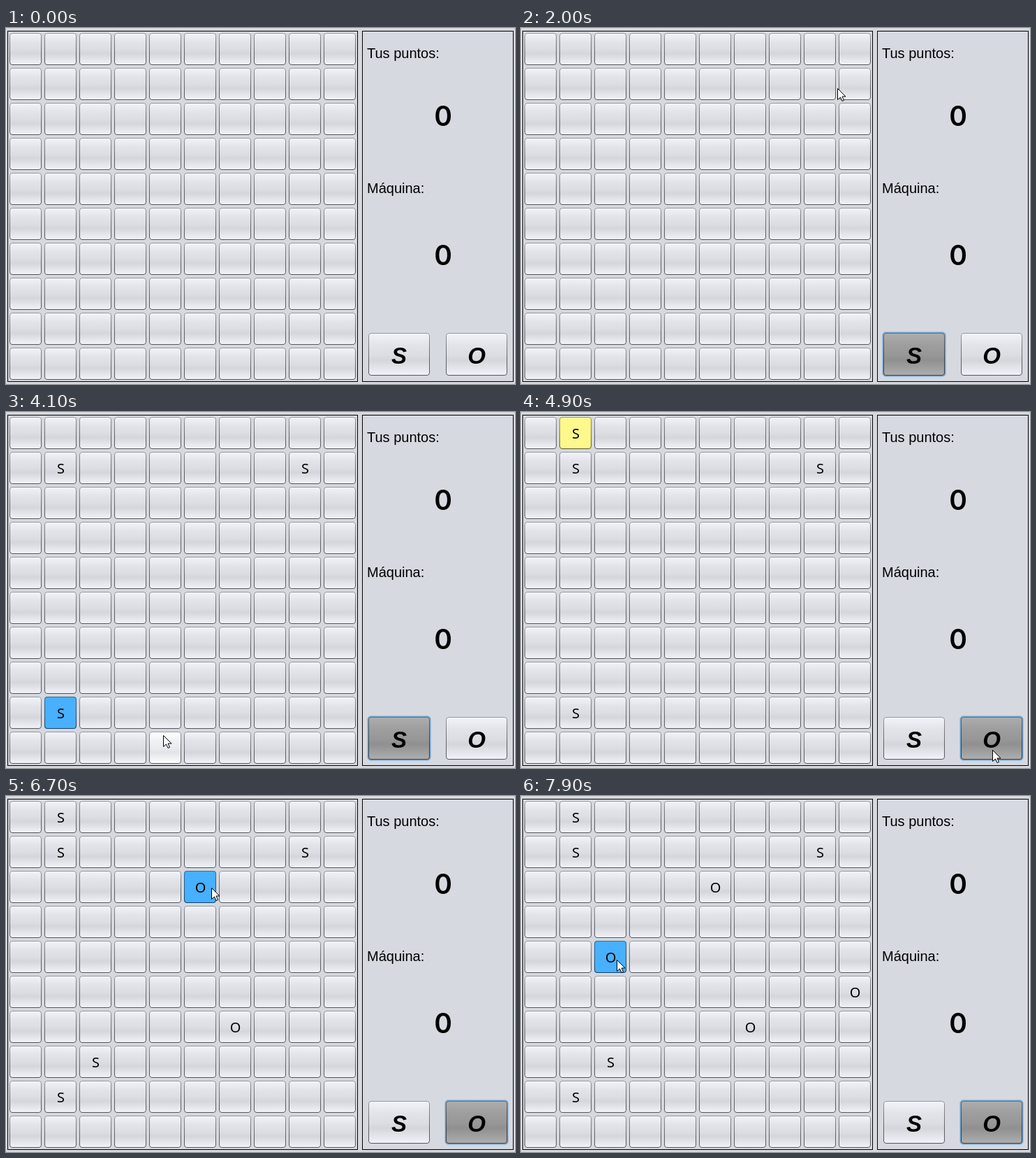
Write an HTML page with a canvas that moves like this. It is 729x509 px and loops after 8 s.

```html
<!DOCTYPE html>
<html lang="es">
<head>
<meta charset="utf-8">
<title>SOS</title>
<style>
html, body { margin: 0; width: 100%; height: 100%; overflow: hidden; background: #d6d8dd; }
canvas { display: block; }
</style>
</head>
<body>
<canvas id="stage" width="729" height="509"></canvas>
<script>
const ctx = document.getElementById('stage').getContext('2d');
const LOOP = 8000, STEP = 100;
const PLAYER = '#47b0ff', MACHINE = '#fff88c';

const cell = (col, row) => ({ x: 5 + col * 50, y: 7 + row * 50, w: 46, h: 46 });
const tools = {
  S: { x: 519, y: 436, w: 88, h: 61 },
  O: { x: 630, y: 436, w: 88, h: 61 }
};

// Player and machine take turns, starting with the player.
const play = (time, letter, col, row) => ({ time, letter, col, row });
const plays = [
  play(2400, 'S', 8, 1), play(2600, 'S', 1, 1),
  play(3600, 'S', 1, 8), play(4500, 'S', 1, 0),
  play(5400, 'O', 6, 6), play(5800, 'S', 2, 7),
  play(6600, 'O', 5, 2), play(6800, 'O', 9, 5),
  play(7800, 'O', 2, 4)
];
plays.forEach((p, i) => { p.color = i % 2 ? MACHINE : PLAYER; });
const picks = [{ time: 1400, letter: 'S' }, { time: 4900, letter: 'O' }];

// The pointer rests on everything it clicks and wanders in between.
const point = (time, x, y) => ({ time, x, y });
function rest(box, dx, dy, from, to) {
  return [from, to].map(time => point(time, box.x + dx, box.y + dy));
}
const path = [
  point(100, 598, 141), point(500, 559, 230), point(700, 559, 230),
  point(2100, 440, 40), point(2800, 369, 328), point(3400, 100, 490),
  point(4100, 225, 462), point(5500, 355, 367), point(5800, 370, 388),
  point(6700, 294, 131), point(7200, 215, 312),
  ...picks.flatMap(p => rest(tools[p.letter], 45, 47, p.time - 200, p.time + 200)),
  ...plays.filter(p => p.color === PLAYER)
    .flatMap(p => rest(cell(p.col, p.row), 32, 27, p.time - 100, p.time))
].sort((a, b) => a.time - b.time);

function pointerAt(t) {
  if (t < path[0].time) return null;
  const i = path.findIndex(p => p.time > t);
  if (i < 0) return path[path.length - 1];
  const a = path[i - 1], b = path[i];
  const k = (t - a.time) / (b.time - a.time), ease = k * k * (3 - 2 * k);
  return {
    x: Math.round(a.x + (b.x - a.x) * ease),
    y: Math.round(a.y + (b.y - a.y) * ease)
  };
}

function inside(p, { x, y, w, h }) {
  return p && p.x >= x && p.x < x + w && p.y >= y && p.y < y + h;
}

function gradient(y, h, stops) {
  const g = ctx.createLinearGradient(0, y, 0, y + h);
  for (const [at, color] of stops) g.addColorStop(at, color);
  return g;
}

// Glossy face: light ends around a darker band below the middle.
function gloss(y, h, base, tint) {
  const shade = d => `rgb(${base + d}, ${base + d + tint / 3}, ${base + d + tint})`;
  return gradient(y, h, [
    [0, shade(22)], [0.3, shade(5)], [0.5, shade(0)], [0.64, shade(-8)], [1, shade(22)]
  ]);
}

function rounded(x, y, w, h, r) {
  ctx.beginPath();
  ctx.roundRect(x, y, w, h, r);
}

function button({ x, y, w, h }, face, focused) {
  if (focused) {
    rounded(x - 1.5, y - 1.5, w + 3, h + 3, 5);
    ctx.fillStyle = '#73a4d1';
    ctx.fill();
  }
  rounded(x, y, w, h, 4);
  ctx.fillStyle = face;
  ctx.fill();
  rounded(x + 0.5, y + 0.5, w - 1, h - 1, 3.5);
  ctx.strokeStyle = gradient(y, h, [[0, 'rgba(0, 4, 14, 0.38)'], [1, 'rgba(0, 4, 14, 0.66)']]);
  ctx.stroke();
}

function text(str, x, y, font, align = 'center') {
  ctx.font = font;
  ctx.textAlign = align;
  ctx.fillStyle = '#000';
  ctx.fillText(str, x, y);
}

function drawPointer({ x, y }) {
  const outline = [[0, 0], [0, 16], [4, 12.5], [6.5, 18], [9, 17], [6.5, 11.5], [11.5, 11.5]];
  ctx.beginPath();
  outline.forEach(([dx, dy]) => ctx.lineTo(x + dx + 0.5, y + dy + 0.5));
  ctx.closePath();
  ctx.fillStyle = '#fff';
  ctx.fill();
  ctx.strokeStyle = '#000';
  ctx.stroke();
}

// The machine's answer sends the focus to the first cell.
function focusOf(pick, last) {
  if (!pick) return '';
  const answered = last && last.color === MACHINE && last.time > pick.time;
  return answered ? 'first' : pick.letter;
}

const lightFace = (box, hovered) => gloss(box.y, box.h, hovered ? 234 : 220, hovered ? 6 : 7);

function drawBoard(done, last, focus, pointer) {
  for (let i = 0; i < 100; i++) {
    const col = i % 10, row = Math.floor(i / 10), box = cell(col, row);
    const here = done.find(p => p.col === col && p.row === row);
    const face = here && here === last
      ? here.color
      : lightFace(box, !here && inside(pointer, box));
    button(box, face, focus === 'first' && i === 0);
    if (here) text(here.letter, box.x + 23.5, box.y + 31, '20px "Noto Sans", sans-serif');
  }
}

function drawSide(pick, focus, pointer) {
  for (const [label, y] of [['Tus puntos:', 43], ['Máquina:', 236]]) {
    text(label, 517, y, '20px "Liberation Sans", sans-serif', 'left');
  }
  for (const y of [140, 339]) text('0', 626, y, '600 39px Inter, sans-serif');
  for (const [letter, box] of Object.entries(tools)) {
    const held = pick && pick.letter === letter;
    const face = held ? gloss(box.y, box.h, 152, 0) : lightFace(box, inside(pointer, box));
    button(box, face, focus === letter);
    text(letter, box.x + 44, 480, 'italic bold 33px "Liberation Sans", sans-serif');
  }
}

function draw(t) {
  const done = plays.filter(p => p.time <= t), last = done[done.length - 1];
  const pick = picks.filter(p => p.time <= t).pop();
  const focus = focusOf(pick, last);
  const pointer = pointerAt(t);

  ctx.lineWidth = 1;
  ctx.fillStyle = '#d6d8dd';
  ctx.fillRect(0, 0, 729, 509);
  ctx.fillStyle = '#d6d9e0';
  ctx.fillRect(510, 4, 217, 502);
  ctx.strokeStyle = '#000';
  ctx.strokeRect(2.5, 4.5, 501, 501);
  ctx.strokeRect(510.5, 4.5, 216, 501);
  drawBoard(done, last, focus, pointer);
  drawSide(pick, focus, pointer);
  if (pointer) drawPointer(pointer);
}

const start = performance.now();
function tick() {
  const t = (performance.now() - start) % LOOP;
  draw(Math.floor(t / STEP) * STEP);
  requestAnimationFrame(tick);
}
tick();
</script>
</body>
</html>
```
